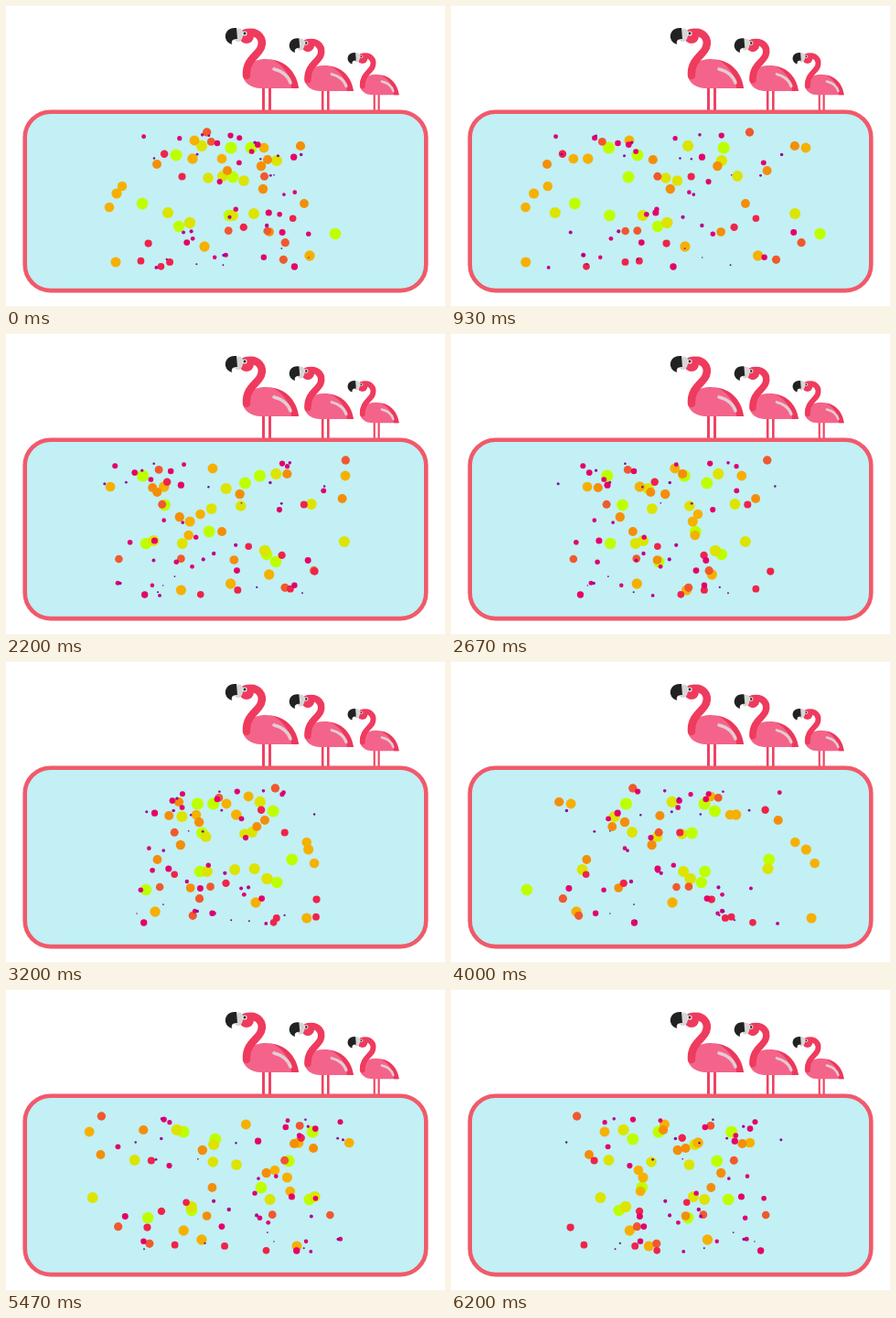
An HTML page with a canvas that plays this animation: 480x328 px, repeating every 6.27 s.

```html
<!DOCTYPE html>
<html lang="en">
<head>
<meta charset="utf-8">
<title>Flamingo pool</title>
<style>
html, body { margin: 0; width: 100%; height: 100%; overflow: hidden; background: #fff; }
canvas { display: block; width: 480px; height: 328px; }
</style>
</head>
<body>
<canvas id="stage"></canvas>
<script>
const canvas = document.getElementById('stage');
const ctx = canvas.getContext('2d');
const dpr = window.devicePixelRatio || 1;
canvas.width = 480 * dpr;
canvas.height = 328 * dpr;

const LOOP = 6270;
const STEP = 0.06; // turn per picture, in radians
const CENTER = 240;
const COUNT = 94;

// Dots circle a vertical axis: [x at 0 deg, x at 90 deg, y], largest first.
const orbits = [
  [6, -96, 155], [28, 53, 155], [-54, 0, 163], [8, -69, 187], [-91, -59, 216],
  [4, -93, 229], [120, 112, 249], [-51, 27, 241], [-39, 30, 237], [-26, 49, 153],
  [56, 25, 169], [-63, -113, 226], [31, 155, 227], [8, -48, 229], [-3, 101, 186],
  [20, -8, 191], [-19, 10, 188], [-36, -89, 167], [92, 46, 273], [-23, 42, 263],
  [-119, -94, 205], [-120, -105, 280], [-34, -30, 147], [42, 161, 155], [-4, -139, 167],
  [-127, -99, 220], [-113, -79, 197], [39, 34, 175], [41, -37, 200], [82, 109, 153],
  [46, -67, 168], [-75, -114, 173], [2, 140, 180], [86, 33, 216], [48, 31, 247]
];

// Colours for radius 0.5, 1, 1.5 and so on.
const ramp = ('#5a148c #7a0a92 #960096 #b8008a #de0076 #e2006e #e60069 ' +
  '#f0234a #f1582d #f48e08 #f6b000 #dce400 #beff00').split(' ');

function makeDot(a, b, y, r) {
  return { a, b, y, r, color: ramp[Math.round(r * 2) - 1] };
}

let seed = 41;
function random() {
  seed = (seed * 16807) % 2147483647;
  return seed / 2147483647;
}
const spread = size => (random() * 2 - 1) * size;

const dots = orbits.map(([a, b, y], i) => makeDot(a, b, y, 6.62 - 0.052 * i));
const rest = COUNT - dots.length;
for (let i = 0; i < rest; i++) {
  const y = 138 + random() * 150;
  dots.push(makeDot(spread(95), spread(140), y, 4.7 - 4 * i / rest));
}

const shapes = {
  legs: new Path2D('M41 66h3v25h-3zM48 66h3v25h-3z'),
  neck: new Path2D('M25 6C37 4 43 13 40 22C37 31 23 35 24 53'),
  body: new Path2D('M20 52C20 42 32 35 45 35C64 35 78 47 81 67L40 67C28 67 20 60 20 52Z'),
  tail: new Path2D('M53 36C70 39 79 52 81 67L73 67C73 55 66 43 53 36Z'),
  feather: new Path2D('M54 46C63 48 70 54 72 61'),
  beak: new Path2D('M13 1C4 0 0 6 1 12C2 16 5 18 8 19C7 15 9 13 14 13Z'),
  face: new Path2D('M12 2C18 0 22 4 20 10C19 16 14 18 11 14Z')
};

function fill(shape, color) {
  ctx.fillStyle = color;
  ctx.fill(shape);
}

function line(shape, color, width) {
  ctx.strokeStyle = color;
  ctx.lineWidth = width;
  ctx.lineCap = 'round';
  ctx.stroke(shape);
}

function disc(x, y, r, color) {
  ctx.fillStyle = color;
  ctx.beginPath();
  ctx.arc(x, y, r, 0, Math.PI * 2);
  ctx.fill();
}

function flamingo(x, scale) {
  ctx.save();
  ctx.translate(x, 114 - 91 * scale);
  ctx.scale(scale, scale);
  fill(shapes.legs, '#ee4263');
  fill(shapes.body, '#f4648a');
  fill(shapes.tail, '#ec385b');
  line(shapes.neck, '#ee3b5e', 8.5);
  line(shapes.feather, '#e3cdd5', 3.5);
  disc(24, 10, 8, '#ee3b5e');
  fill(shapes.face, '#d6d6d6');
  fill(shapes.beak, '#222');
  disc(22, 7, 2.6, '#eee');
  disc(22, 7, 1.4, '#222');
  ctx.restore();
}

function pool() {
  ctx.beginPath();
  ctx.roundRect(20.7, 115.7, 438.6, 195.4, 28);
  ctx.fillStyle = '#c2f0f5';
  ctx.fill();
  ctx.strokeStyle = '#f05a6b';
  ctx.lineWidth = 4.6;
  ctx.stroke();
}

// Three pictures every 200 ms, held 70, 60 and 70 ms.
function pictureAt(ms) {
  const part = ms % 200;
  return 3 * Math.floor(ms / 200) + (part >= 70) + (part >= 130);
}

function draw(ms) {
  const angle = STEP * pictureAt(ms % LOOP);
  const c = Math.cos(angle), s = Math.sin(angle);
  ctx.setTransform(dpr, 0, 0, dpr, 0, 0);
  ctx.fillStyle = '#fff';
  ctx.fillRect(0, 0, 480, 328);
  flamingo(239, 1);
  flamingo(309, 0.875);
  flamingo(373, 0.7);
  pool();
  for (const d of dots) disc(CENTER + d.a * c + d.b * s, d.y, d.r, d.color);
}

const start = performance.now();
function tick() {
  draw(performance.now() - start);
  requestAnimationFrame(tick);
}
tick();
</script>
</body>
</html>
```
